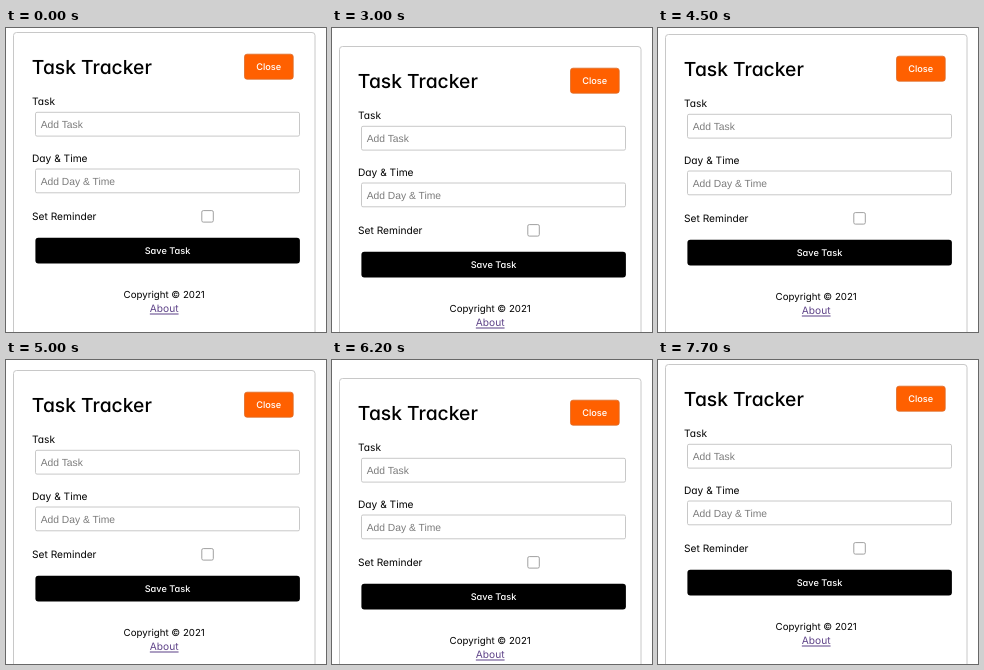
Recreate the animation shown at these times as an HTML page. Size 320x304 px, loop 8 s.

```html
<!DOCTYPE html>
<html lang="en">
<head>
<meta charset="utf-8">
<title>Task Tracker</title>
<style>
  html, body { margin: 0; height: 100%; overflow: hidden; background: #fff; }
  svg { display: block; width: 320px; height: 304px; }
  text { font: 10.2px Inter, sans-serif; font-feature-settings: "cv11"; text-rendering: geometricPrecision; }
  .title { font-size: 19.3px; font-weight: 500; }
  .button { font-size: 9.2px; font-weight: 500; fill: #fff; text-anchor: middle; }
  .hint { font: 10.3px "Liberation Sans", Arial, sans-serif; fill: #7c7c7c; }
  .line { fill: #fff; stroke: #c8c8c8; }
  .footer { text-anchor: middle; }
  .copyright { font-size: 9.7px; }
  .link { fill: #5f4489; text-decoration: underline; }
</style>
</head>
<body>
<svg viewBox="0 0 320 304">
  <g id="card">
    <rect id="frame" class="line" x=".5" y=".5" width="301.5" rx="3"/>
    <text class="title" x="18.8" y="41.6">Task Tracker</text>

    <g id="closed">
      <rect x="238" y="22.4" width="42" height="25" rx="2.5" fill="#318a00" stroke="#4f8a30" stroke-width=".8"/>
      <text class="button" x="258.7" y="38" style="font-size:9.8px">Add</text>
    </g>

    <g id="open">
      <rect x="231.5" y="22.2" width="48.7" height="25" rx="2.5" fill="#ff6000" stroke="#dc6a28" stroke-width=".8"/>
      <text class="button" x="255.7" y="38">Close</text>
      <text x="19" y="72.8">Task</text>
      <rect class="line" x="22.5" y="80.3" width="264" height="23.8" rx="1.5"/>
      <text class="hint" x="27.7" y="95.9">Add Task</text>
      <text x="19" y="129.8">Day &amp; Time</text>
      <rect class="line" x="22.5" y="137" width="264" height="23.8" rx="1.5"/>
      <text class="hint" x="27.7" y="152.7">Add Day &amp; Time</text>
      <text x="19" y="188">Set Reminder</text>
      <rect class="line" x="188.8" y="178.6" width="11.5" height="11.5" rx="1.5" style="stroke:#a0a0a0"/>
      <rect x="22.4" y="205.8" width="264.5" height="25.8" rx="3"/>
      <text class="button" x="154.5" y="222">Save Task</text>
    </g>

    <g id="footer" class="footer">
      <text class="copyright">Copyright © 2021</text>
      <text class="link" y="14.7">About</text>
    </g>
  </g>
</svg>
<script>
  const LOOP = 8000, CLOSED = null;

  // [start in ms, top of the open card]; the page jumps between scroll positions
  const steps = [
    [0, 4], [1400, CLOSED], [3000, 18],
    [4300, 17], [4400, 12], [4500, 6], [4600, 4],
    [4900, 5], [5000, 10], [5100, 18],
    [5400, CLOSED], [6100, 18],
    [7400, 17.9], [7500, 13], [7600, 7], [7700, 4]
  ];

  const el = id => document.getElementById(id);
  const move = (id, x, y) => el(id).setAttribute("transform", `translate(${x} ${y})`);
  const show = (id, on) => el(id).setAttribute("visibility", on ? "visible" : "hidden");

  function draw(time) {
    const top = steps.findLast(([start]) => start <= time)[1];
    const isOpen = top !== CLOSED;
    show("open", isOpen);
    show("closed", !isOpen);
    move("card", isOpen ? 7 : 10, isOpen ? top : 18);
    move("footer", 151.2, isOpen ? 265.8 : 79);
    el("frame").setAttribute("height", isOpen ? 330 : 180);
  }

  const begin = performance.now();
  function tick() {
    draw((performance.now() - begin) % LOOP);
    requestAnimationFrame(tick);
  }
  tick();
</script>
</body>
</html>
```
